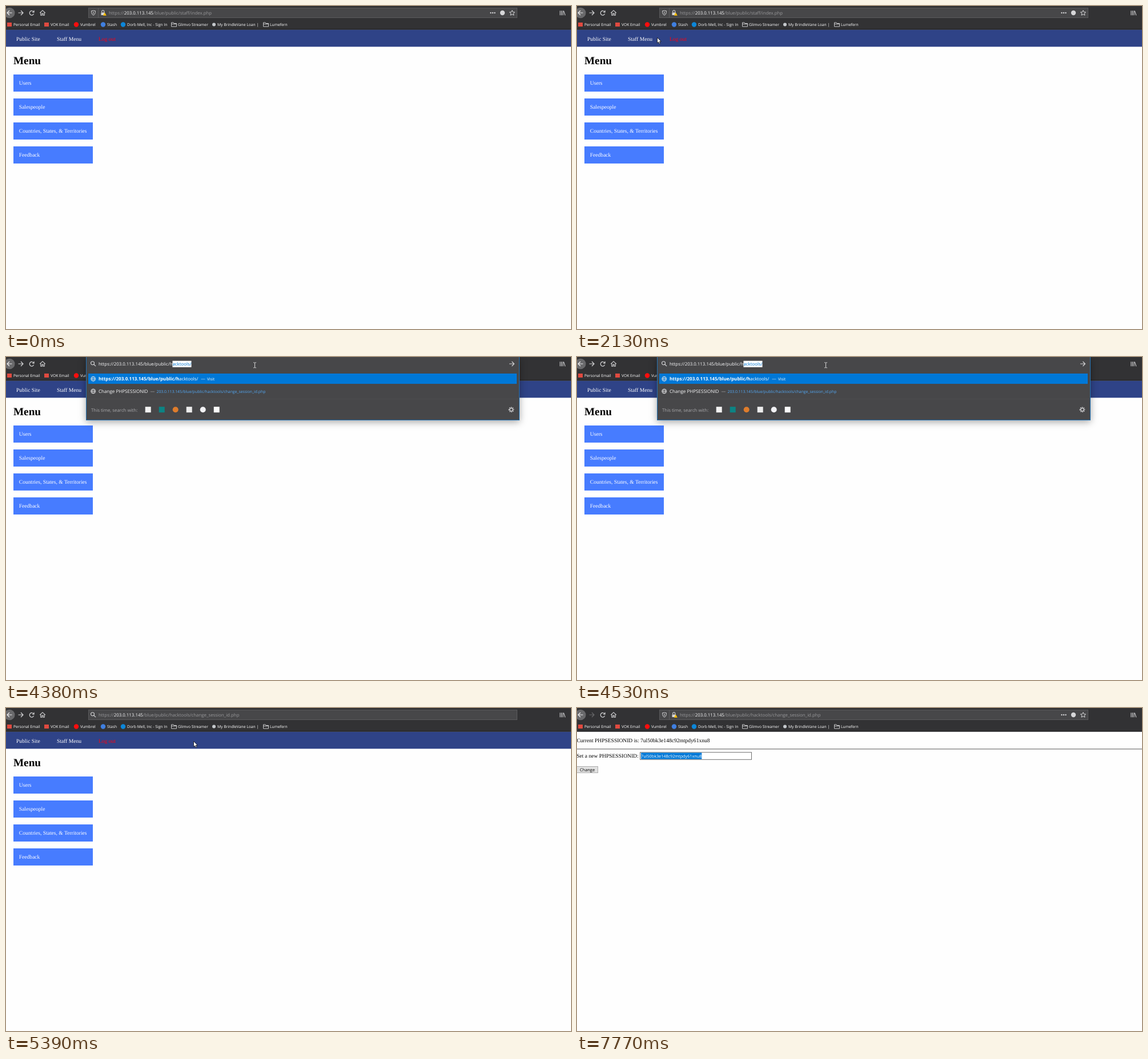
An HTML page with a canvas that plays this animation: 989x566 px, repeating every 8 s.

```html
<!DOCTYPE html>
<html lang="en">
<head>
<meta charset="utf-8">
<title>Session change</title>
<style>
html, body { margin: 0; width: 100%; height: 100%; overflow: hidden; background: #fefefe; }
canvas { display: block; }
</style>
</head>
<body>
<canvas id="stage" width="989" height="566"></canvas>
<script>
const ctx = document.getElementById('stage').getContext('2d');
ctx.textRendering = 'geometricPrecision';

const LOOP = 8000;
const UI = '"Open Sans", "Noto Sans", sans-serif';
const SERIF = '"Liberation Serif", "Times New Roman", serif';
const URL_FONT = `7.85px ${UI}`;
const SMALL = `6.75px ${UI}`;
const BODY = `9.55px ${SERIF}`;
const FIELD = `7.25px ${UI}`;
const LIGHT = '#f9f9fa', ICON = '#d6d6d8', BLUE = '#0078d7';
const TOP = 41.4; // where the page begins

const SCHEME = 'https://', HOST = '203.0.113.145', BASE = '/blue/public/';
const STAFF = 'staff/index.php', TOOLS = 'hacktools/', PAGE = TOOLS + 'change_session_id.php';
const SESSION = '7ul50bk3e148c92mtpdy61xnu8';

const T = { focus: 3520, panel: 4380, go: 5310, loaded: 5540, grab: 6310, held: 6690, gone: 7770 };
const CLICKS = [[3520, 3750], [5230, 5310], [6310, 6690]];

// Each move: start, end, steps, evenly spaced waypoints.
const MOVES = [
  [220, 360, 3, [[980, 560], [903, 498], [720, 352], [629, 385]]],
  [590, 900, 5, [[629, 385], [420, 215], [197, 87]]],
  [1050, 1510, 7, [[197, 87], [172, 70], [156, 62]]],
  [1740, 2280, 8, [[156, 62], [166, 63], [150, 60], [140, 55], [347, 28]]],
  [2450, 3140, 10, [[347, 28], [320, 14], [290, 11], [306, 12]]],
  [3520, 3830, 5, [[306, 12], [317, 12], [350, 12], [390, 13], [425, 14], [435, 14]]],
  [4380, 5160, 11, [[435, 14], [435, 14], [400, 36], [345, 56], [328, 58]]],
  [5230, 6000, 11, [[328, 58], [328, 58], [200, 85], [150, 94]]],
  [6080, 6690, 9, [[150, 94], [140, 97], [185, 95], [224, 84], [224, 84], [185, 84], [140, 84], [100, 92], [80, 108], [73, 113]]],
  [6920, 7690, 11, [[73, 113], [200, 150], [336, 330], [302, 537]]]
];

function cursorAt(t) {
  if (t < MOVES[0][0] || t >= T.gone) return null;
  const [a, b, n, pts] = MOVES.filter(m => m[0] <= t).pop();
  const step = Math.min(n - 1, Math.floor((t - a) / (b - a) * (n - 1)));
  const u = (step + 1) / n * (pts.length - 1);
  const i = Math.min(pts.length - 2, Math.floor(u));
  const mix = k => pts[i][k] + (pts[i + 1][k] - pts[i][k]) * (u - i);
  return { x: mix(0), y: mix(1) };
}

function rect(x, y, w, h, fill) {
  ctx.fillStyle = fill;
  ctx.fillRect(x, y, w, h);
}

function frame(x, y, w, h, color) {
  ctx.strokeStyle = color;
  ctx.lineWidth = 1;
  ctx.strokeRect(x + 0.5, y + 0.5, w - 1, h - 1);
}

function disc(x, y, r, fill) {
  ctx.fillStyle = fill;
  ctx.beginPath();
  ctx.arc(x, y, r, 0, 7);
  ctx.fill();
}

function line(d, x, y, color = ICON, width = 1) {
  ctx.save();
  ctx.translate(x, y);
  ctx.strokeStyle = color;
  ctx.lineWidth = width;
  ctx.stroke(new Path2D(d));
  ctx.restore();
}

function text(str, x, y, font, color) {
  ctx.font = font;
  ctx.fillStyle = color;
  ctx.fillText(str, x, y);
  return x + ctx.measureText(str).width;
}

function runs(x, y, parts) {
  for (const [str, font, color] of parts) x = text(str, x, y, font, color);
  return x;
}

function widthOf(str, font) {
  ctx.font = font;
  return ctx.measureText(str).width;
}

// Number of leading characters that fit within a width.
function fit(str, font, room) {
  let n = 0;
  while (n < str.length && widthOf(str.slice(0, n + 1), font) <= room) n++;
  return n;
}

function marked(str, x, y, font, color, back) {
  const w = widthOf(str, font);
  rect(x, y - 8.6, w, 11.2, back);
  return text(str, x, y, font, color);
}

function globe(x, y) {
  line('M-4 0a4 4 0 1 0 8 0a4 4 0 1 0-8 0M-4 0H4M0-4C-2.6-1.5-2.6 1.5 0 4C2.6 1.5 2.6-1.5 0-4', x, y, '#e6e6e8', 0.9);
}

function magnifier() {
  line('M-4-1.3a3 3 0 1 0 6 0a3 3 0 1 0-6 0M1.3 1L4.6 4.2', 152.5, 12, ICON, 1.1);
}

function folder(x) {
  line('M-4.5 3.5V-3.5H-1L0-2H4.5V3.5ZM-4.5-.8H4.5', x, 32.5, ICON, 0.9);
}

function toolbar(t) {
  rect(0, 0, 989, TOP, '#323234');
  rect(0, TOP - 1, 989, 1, '#161618');
  disc(6.2, 12, 9.3, '#69696b');
  line('M4.5 0H-4M0-4L-4 0L0 4', 6, 12, '#eeeeef', 1.2);
  line('M-4.5 0H4M0-4L4 0L0 4', 26, 12, t < T.loaded ? ICON : '#69696b', 1.2);
  line('M3.3-2A3.8 3.8 0 1 0 3.6 1.3M4-4.5V-1.3H.8', 45, 12.3, ICON, 1.2);
  line('M-4.8 .2L0-4.3L4.8 .2M-3.2-.6V4.2H-1V1H1V4.2H3.2V-.6', 64, 12, ICON, 1.1);
  line('M-4-4V4M-1.5-4V4M1-4V4M2.3-3.7L4.8 4', 974, 12.3, ICON, 1.1);

  const marks = [
    [6, '#e04a3f', 'Personal Email', 13], [71, '#e04a3f', 'VOK Email', 78],
    [123, '#fb0d0d', 'Vumbrel', 130], [170, '#3f7fe0', 'Stash', 177],
    [205, '#0c86d8', 'Dorb Mell, Inc - Sign In', 212], [294, null, 'Glimvo Streamer', 301],
    [364, '#c4c8cc', 'My BrindleVane Loan |', 370], [455, null, 'Lumefern', 462]
  ];
  marks.forEach(([ix, color, label, x], i) => {
    if (!color) folder(ix);
    else if (i < 2) rect(ix - 4, 29, 8, 7, color);
    else disc(ix, 32.5, i === 6 ? 3 : 4.2, color);
    text(label, x, 35.3, SMALL, '#fff');
  });
}

function siteIcons() {
  line('M-3.3-3.5Q0-3.8 0-4Q0-3.8 3.3-3.5V-.5Q3 2.8 0 4.2Q-3 2.8-3.3-.5ZM0-2V2', 153, 12, ICON, 1);
  line('M0-9V9', 161.5, 12, '#5d5d5f', 1);
  rect(166.5, 11.5, 6.5, 4.5, ICON);
  line('M-2 0V-2A2 2 0 0 1 2-2V0', 169.7, 11.5, ICON, 1.1);
  ctx.fillStyle = '#ffbf00';
  ctx.fill(new Path2D('M172.8 11.2L175.8 16.8H169.8Z'));
  for (const x of [848.5, 852, 855.5]) disc(x, 12, 1.2, ICON);
  disc(869, 12, 4.2, ICON);
  line('M0-4.6L1.4-1.6L4.6-1.3L2.2 .8L3 4L0 2.3L-3 4L-2.2 .8L-4.6-1.3L-1.4-1.6Z', 886, 12.2, ICON, 1);
}

function addressBar(t, cur) {
  const focused = t >= T.focus && t < T.go;
  if (t >= T.panel && t < T.go) return panel();
  if (focused) {
    const grow = t < T.focus + 80 ? 0 : 1;
    rect(141 - grow, 0, 757 + 2 * grow, 25, '#474749');
    frame(141 - grow, -1, 757 + 2 * grow, 26, '#1f6fae');
  } else {
    rect(144, 3, 751, 18, '#474749');
    frame(144, 3, 751, 18, '#5a5a5c');
  }
  const loading = t >= T.go && t < T.loaded;
  if (loading) magnifier(); else siteIcons();

  const y = 15.3, x = loading ? 162 : 180;
  if (!focused) {
    const grey = '#98989a';
    runs(x, y, [
      [SCHEME, URL_FONT, grey], [HOST, URL_FONT, LIGHT],
      [BASE + (t < T.go ? STAFF : PAGE), URL_FONT, grey]
    ]);
    return;
  }
  const start = text(SCHEME + HOST + BASE, x, y, URL_FONT, LIGHT);
  const n = fit(STAFF, URL_FONT, cur.x - 6 - start);
  const mid = marked(STAFF.slice(0, n), start, y, URL_FONT, BLUE, '#fff');
  text(STAFF.slice(n), mid, y, URL_FONT, LIGHT);
}

function panel() {
  ctx.save();
  ctx.shadowColor = 'rgba(0,0,0,.35)';
  ctx.shadowBlur = 12;
  ctx.shadowOffsetY = 3;
  rect(140, 0, 759, 111, '#474749');
  ctx.restore();
  frame(140, -1, 759, 112, '#2573b3');
  magnifier();
  line('M-4.5 0H4M0-4L4 0L0 4', 885.5, 12, ICON, 1.1);

  const typed = SCHEME + HOST + BASE + 'h', rest = TOOLS.slice(1);
  const end = text(typed, 162, 15.3, URL_FONT, LIGHT);
  marked(rest, end, 15.3, URL_FONT, BLUE, '#fff');

  rect(144, 29, 750, 18, BLUE);
  globe(152.7, 38.3);
  runs(162, 41.2, [
    [typed, `bold 8.1px ${UI}`, '#fff'], [rest, URL_FONT, '#fff']
  ]);
  text('—', 341, 41.2, URL_FONT, '#cfe4f6');
  text('Visit', 352, 41, SMALL, '#fff');

  globe(152.7, 60);
  text('Change PHPSESSIONID', 162, 63, `8.05px ${UI}`, LIGHT);
  text('—', 252.5, 63, URL_FONT, '#b0b0b2');
  text(HOST + BASE + PAGE, 263.5, 62.8, `6.82px ${UI}`, '#52a8f5');

  rect(141, 73, 757, 1, '#4d4d4f');
  text('This time, search with:', 149, 95.6, URL_FONT, '#a9a9ab');
  ['#f3f3f3', '#0c8484', '#de7c2c', '#ededed', '#f2f2f5', '#fafafa'].forEach((c, i) => {
    const x = 248.7 + i * 24;
    if (i === 2 || i === 4) disc(x, 92.2, 5, c);
    else rect(x - 5, 87.2, 10, 10, c);
  });
  ctx.setLineDash([1.5, 1.43]);
  line('M-4 0a4 4 0 1 0 8 0a4 4 0 1 0-8 0', 884.5, 92.2, ICON, 1.6);
  ctx.setLineDash([]);
  line('M-2.6 0a2.6 2.6 0 1 0 5.2 0a2.6 2.6 0 1 0-5.2 0', 884.5, 92.2, ICON, 1.2);
}

function menuPage() {
  rect(0, TOP, 989, 30, '#2f4387');
  text('Public Site', 18, 60.5, BODY, '#fff');
  text('Staff Menu', 89, 60.5, BODY, '#fff');
  text('Log out', 162, 60.5, BODY, '#ff0010');
  text('Menu', 13, 102, `bold 19.2px ${SERIF}`, '#000');
  ['Users', 'Salespeople', 'Countries, States, & Territories', 'Feedback'].forEach((label, i) => {
    const y = 120 + i * 42;
    rect(13, y, 139, 30, '#477cff');
    text(label, 22.8, y + 18, BODY, '#fff');
  });
}

function sessionPage(t, cur) {
  text('Current PHPSESSIONID is: ' + SESSION, -0.6, 60, BODY, '#000');
  rect(0, TOP + 30, 989, 1, '#555');
  text('Set a new PHPSESSIONID:', -0.8, 87, BODY, '#000');
  rect(110, 77, 196, 14, '#fff');
  frame(110, 77.2, 196, 13.6, '#6e6e6e');

  const x = 112, y = 87;
  let n = SESSION.length;
  if (t >= T.grab) n = t < T.held ? fit(SESSION, FIELD, cur.x - x) : 0;
  const mid = text(SESSION.slice(0, n), x, y, FIELD, '#000');
  marked(SESSION.slice(n), mid, y, FIELD, '#fff', BLUE);

  rect(-1, 102, 38, 12, '#e1e1e1');
  frame(-1, 102, 38, 12, '#adadad');
  text('Change', 5, 110.7, `7.4px ${UI}`, '#000');
}

function pointer(t, { x, y }) {
  if (CLICKS.some(([a, b]) => t >= a && t < b)) disc(x, y, 7, 'rgba(205,184,10,.8)');
  const inBar = y < 24 && x > 178 && x < 840;
  const inField = t >= T.loaded && x > 110 && x < 306 && y > 77 && y < 91;
  if (inBar || inField) {
    line('M-2.5-4.5H-.7L0-4L.7-4.5H2.5M0-4V4M-2.5 4.5H-.7L0 4L.7 4.5H2.5', x + 0.5, y + 0.3, inBar ? '#e4e4e4' : '#222', 0.9);
    return;
  }
  ctx.save();
  ctx.translate(x + 0.5, y + 0.3);
  const arrow = new Path2D('M0 0V9.6L2.2 7.6L3.7 11L5.3 10.3L3.8 7H6.8Z');
  ctx.fillStyle = '#fff';
  ctx.fill(arrow);
  ctx.strokeStyle = '#111';
  ctx.lineWidth = 0.8;
  ctx.stroke(arrow);
  ctx.restore();
}

function draw() {
  const t = performance.now() % LOOP;
  const cur = cursorAt(t);
  rect(0, 0, 989, 566, '#fefefe');
  if (t < T.loaded) menuPage(); else sessionPage(t, cur);
  toolbar(t);
  addressBar(t, cur);
  if (cur) pointer(t, cur);
  requestAnimationFrame(draw);
}
draw();
</script>
</body>
</html>
```
